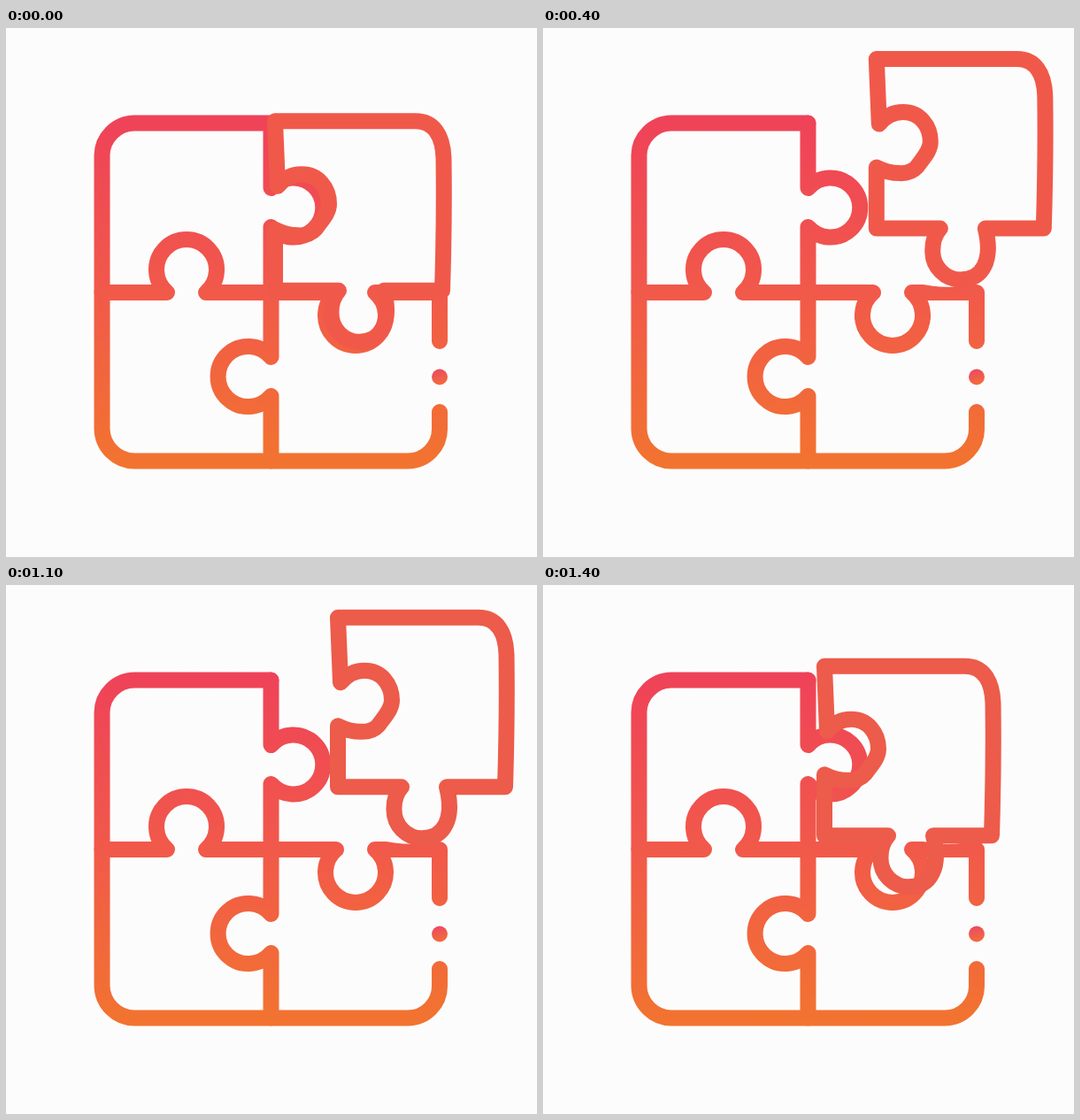
Write an HTML page that moves like this. It is 600x598 px and loops after 1500 ms.

```html
<!DOCTYPE html>
<html lang="en">
<head>
<meta charset="utf-8">
<title>Puzzle</title>
<style>
  html, body { margin: 0; height: 100%; overflow: hidden; background: #fdfcfd; }
  svg { display: block; width: 100vw; height: 100vh; }
  .line { fill: none; stroke-width: 18; stroke-linecap: round; stroke-linejoin: round; }
</style>
</head>
<body>
<svg viewBox="0 0 600 598">
  <defs>
    <linearGradient id="warm" gradientUnits="userSpaceOnUse" x1="0" y1="99" x2="0" y2="498">
      <stop offset="0" stop-color="#ef4259"/>
      <stop offset=".5" stop-color="#f1594a"/>
      <stop offset="1" stop-color="#f2742f"/>
    </linearGradient>
    <linearGradient id="spot" x1=".3" y1="0" x2=".6" y2="1">
      <stop offset=".1" stop-color="#ec4c60"/>
      <stop offset=".9" stop-color="#f26a3c"/>
    </linearGradient>
  </defs>

  <g class="line" stroke="url(#warm)">
    <!-- frame -->
    <path d="M299.5 107.5H145A37 37 0 0 0 108.5 144V453A37 37 0 0 0 145 489.5H454A36 36 0 0 0 490 453V434"/>
    <!-- vertical seam -->
    <path d="M299.5 107.5V181A33.5 33.5 0 1 1 299.5 225V372A34 34 0 1 0 299.5 416V489.5"/>
    <!-- horizontal seam -->
    <path d="M108.5 299H182A34 34 0 1 1 226 299H373A34 34 0 1 0 417 299H490V354"/>
  </g>
  <path d="M421 288Q455 297 492 289Z" fill="#fdfcfd"/>
  <circle cx="490" cy="394.5" r="9" fill="url(#spot)"/>

  <path id="piece" class="line" stroke="#f0594a" d="M394 18.5H553C573 18.5 583.5 34 584.5 60Q585.5 130 583 210H517
    C526 246 514 268 489 268A32 32 0 0 1 457.5 236Q457 220 466 210H394V141Q407 147.5 420 147.5Q433 148 440 140
    C446 131 455 123 455 112C455 94 443 78.5 424 78.5Q408 78.5 397 92Z"/>
</svg>
<script>
  const piece = document.getElementById("piece");
  const LOOP = 1500, STEP = 100;

  // Distance from the fully lifted position: out, rest, back in.
  function distance(step) {
    if (step < 5) return 90 - 18.2 * step;
    return Math.max(0, step - 10) * 19;
  }

  function draw() {
    const step = Math.floor(performance.now() % LOOP / STEP);
    const d = distance(step);
    piece.setAttribute("transform", `translate(${-d} ${d * 0.965})`);
    piece.setAttribute("stroke", step < 8 ? "#f0594a" : "#ed5b4a");
    requestAnimationFrame(draw);
  }
  draw();
</script>
</body>
</html>
```
